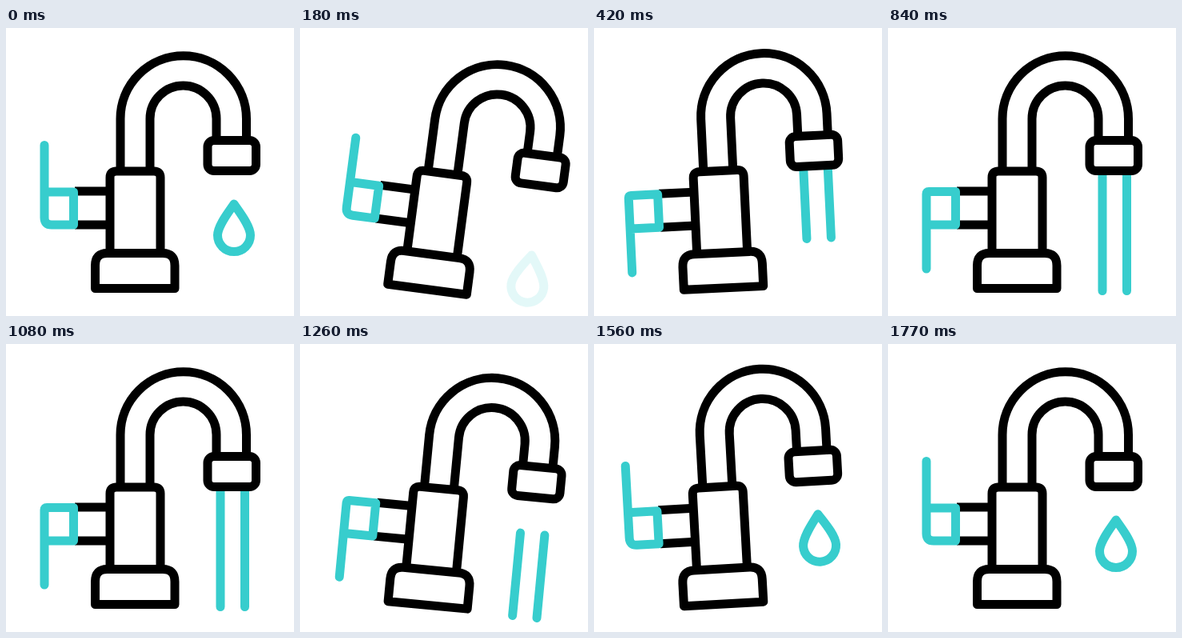
Animation of 360 by 360 pixels, one loop 1.8 s. Source, as an HTML page:

```html
<!DOCTYPE html>
<html lang="en">
<head>
<meta charset="utf-8">
<title>Tap</title>
<style>
  html, body { margin: 0; width: 100%; height: 100%; overflow: hidden; background: #fff; }
  svg { display: block; width: 100vw; height: 100vh; }
  path, rect { fill: none; stroke: #000; stroke-width: 11; stroke-linecap: round; stroke-linejoin: round; }
  .teal { stroke: #37cdcd; }
  .flat { stroke-linecap: butt; }
</style>
</head>
<body>
<svg viewBox="0 0 360 360">
  <g id="tap">
    <path class="teal" id="water"/>
    <path class="teal" id="drop" d="M285 220C279 229 264.5 247 264.5 259a20.5 20.5 0 0 0 41 0C305.5 247 291 229 285 220Z"/>
    <path class="flat" d="M86 204H130M86 246H130"/>
    <path class="flat" d="M143 179V113.5a78.75 78.75 0 0 1 157.5 0V140M180 179V113.5a41.5 41.5 0 0 1 83 0V140"/>
    <path class="flat" d="M130 281V187q0-8 8-8H185q8 0 8 8V281"/>
    <path d="M111.5 325.5V297q0-15.5 15-15.5H196q15 0 15 15.5V325.5Z"/>
    <rect x="252" y="140.5" width="60.5" height="38" rx="8" style="fill:#fff"/>
    <path class="teal" id="handle"/>
  </g>
</svg>
<script>
const LOOP = 1800;
const [tap, water, drop, handle] =
  ['tap', 'water', 'drop', 'handle'].map(id => document.getElementById(id));

const mix = (a, b, u) => a + (b - a) * u;
const span = (t, start, end) => Math.min(1, Math.max(0, (t - start) / (end - start)));
const smooth = u => u * u * (3 - 2 * u);
const soft = u => (u + smooth(u)) / 2;
const cubic = u => u < 0.5 ? 4 * u ** 3 : 1 - 4 * (1 - u) ** 3;

// One sway: lean right, swing back past upright, settle.
function sway(t) {
  if (t < 155) return mix(0, 7.6, cubic(span(t, 0, 155)));
  if (t < 362) return mix(7.6, -3.2, cubic(span(t, 155, 362)));
  return mix(-3.2, 0, cubic(span(t, 362, 540)));
}

function drawHandle(open) {
  const tip = mix(146.5, 301, open);
  const top = mix(205, 204.5, open);
  const topR = mix(1, 3, open);
  const bottomR = mix(9, 1, open);
  handle.setAttribute('d',
    `M84.5 ${top}H${48 + topR}q${-topR} 0 ${-topR} ${topR}V${246 - bottomR}` +
    `q0 ${bottomR} ${bottomR} ${bottomR}H84.5ZM48 225V${tip}`);
}

function drawWater(t) {
  const head = mix(180, 328.5, soft(span(t, 250, 545)));
  const tail = mix(180, 328.5, soft(span(t, 1165, 1450)));
  const visible = t > 250 && t < 1450;
  water.setAttribute('d', visible ? `M268 ${tail}V${head}M298.5 ${tail}V${head}` : '');
}

function drawDrop(t) {
  const leaving = t < 900;
  const y = leaving ? mix(0, 50, soft(span(t, 0, 205)))
                    : mix(-22, 0, smooth(span(t, 1330, 1530)));
  const opacity = leaving ? 1 - span(t, 0, 210) : span(t, 1345, 1490);
  drop.setAttribute('transform', `translate(0 ${y})`);
  drop.setAttribute('opacity', opacity);
}

function render(t) {
  const angle = sway(t < 900 ? t : t - 1170);
  tap.setAttribute('transform', `rotate(${angle} 151 309)`);
  drawHandle(smooth(span(t, 162, 400)) - smooth(span(t, 1270, 1530)));
  drawWater(t);
  drawDrop(t);
}

const begin = performance.now();
function tick() {
  render((performance.now() - begin) % LOOP);
  requestAnimationFrame(tick);
}
tick();
</script>
</body>
</html>
```
